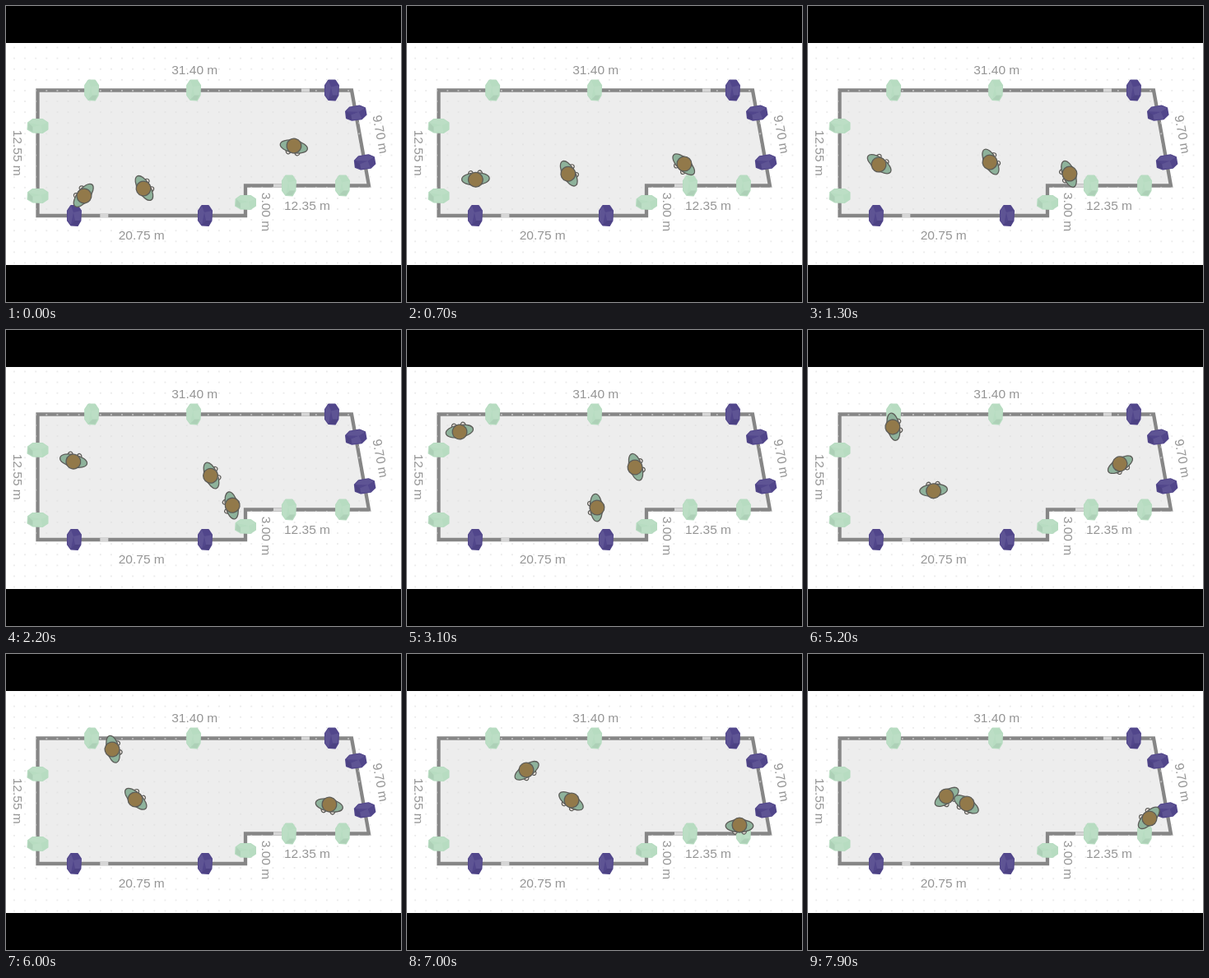
An HTML page that plays this animation: 480x360 px, repeating every 8000 ms.

```html
<!DOCTYPE html>
<html lang="en">
<head>
<meta charset="utf-8">
<title>Floor plan</title>
<style>
html, body { margin: 0; width: 100%; height: 100%; overflow: hidden; background: #000; }
svg { display: block; width: 100vw; height: 100vh; }
text { font: 15.5px "Liberation Sans", Arial, sans-serif; fill: #959595; text-anchor: middle; }
.green { color: #b7dcc1; }
.purple { color: #51468b; }
</style>
</head>
<body>
<svg viewBox="0 0 480 360">
  <defs>
    <pattern id="dots" x="3.500" y="44" width="13.1" height="13.1" patternUnits="userSpaceOnUse">
      <circle cx="6.5" cy="6.5" r=".8" fill="#dedede"/>
    </pattern>
    <g id="gem">
      <path d="M-4-12 4-12 8-6 7.500 6 4 12-4 11.500-8 6-8-6Z" fill="currentColor"
            stroke="currentColor" stroke-width="2" stroke-linejoin="round"/>
      <path d="M-4-12-1-4-4 11-8 6-8-6Z" fill="#fff" opacity=".08"/>
      <path d="M-1-4 8-6 7 6 1 6Z" fill="#fff" opacity=".08"/>
      <path d="M1 6 7 6 4 12-4 11Z" fill="#000" opacity=".05"/>
    </g>
    <g id="walker" stroke="#5c5c58" stroke-width="1.3">
      <ellipse cx="7" cy="-5.500" rx="4" ry="3" fill="#f6ece7"/>
      <ellipse cx="7" cy="5.500" rx="4" ry="3" fill="#f6ece7"/>
      <ellipse cx="1" rx="7.500" ry="16.800" fill="#8eb29b"/>
      <path d="M7-6Q11 0 7 6Z" fill="#f6ece7" stroke="none"/>
      <circle r="8.900" fill="#92794a"/>
    </g>
  </defs>
  <path d="M0 45H480V315H0Z" fill="#fff"/>
  <path id="room" fill="#ededed" stroke="#868686" stroke-width="4.300"/>
  <path d="M0 45H480V315H0Z" fill="url(#dots)"/>
  <g id="plan"></g>
  <g id="people"></g>
</svg>
<script>
const LOOP = 8000;
const DEG = 180 / Math.PI;
const $ = id => document.getElementById(id);

function add(parent, tag, attrs, text = "") {
  const el = document.createElementNS("http://www.w3.org/2000/svg", tag);
  for (const k in attrs) el.setAttribute(k, attrs[k]);
  el.textContent = text;
  parent.append(el);
  return el;
}

const place = (x, y, deg) => `translate(${x} ${y}) rotate(${deg})`;

// Walls run clockwise; marks are fractions of the wall's length.
const walls = [
  { from: [38.5, 102.5], label: "31.40 m", green: [.172, .497], purple: [.937], door: .853 },
  { from: [420, 102.5], label: "9.70 m", purple: [.24, .755] },
  { from: [441, 218.5], label: "12.35 m", green: [.213, .647], door: .74 },
  { from: [291, 218.5], label: "3.00 m", green: [.56] },
  { from: [291, 255], label: "20.75 m", purple: [.194, .824], door: .68 },
  { from: [38.5, 255], label: "12.55 m", green: [.158, .715] }
];
$("room").setAttribute("d", "M" + walls.map(w => w.from).join("L") + "Z");

walls.forEach(({ from: [x, y], label, green = [], purple = [], door }, i) => {
  const [endX, endY] = walls[(i + 1) % walls.length].from;
  const dx = endX - x, dy = endY - y, length = Math.hypot(dx, dy);
  const upright = (Math.atan2(dy, dx) * DEG + 180) % 180;
  const at = (f, out = 0) =>
    place(x + dx * f + dy / length * out, y + dy * f - dx / length * out, upright);

  if (door) add($("plan"), "path", { d: "M-5 0H5", stroke: "#d6d6d6", "stroke-width": 4.3, transform: at(door) });
  for (const [color, spots] of Object.entries({ green, purple }))
    for (const f of spots) add($("plan"), "use", { href: "#gem", class: color, transform: at(f) });
  // On a short wall the label slides past the end.
  add($("plan"), "text", { y: 4.7, transform: at(Math.max(.5, 32 / length), 24.3) }, label);
});

// Waypoints: x, y and, where the walker swerves, a heading in degrees.
const times = [0, 1.3, 3.1, 4.3, 6, 7, 7.9];
const routes = [
  [[95, 231, -142], [86, 193, -54], [64, 124], [73, 118], [129, 116, -14], [145, 141], [168, 173]],
  [[167, 222], [221, 190], [277, 167], [344, 153], [393, 183, 102], [404, 208, 90], [415, 200, -136]],
  [[350, 170, 101], [318, 204], [231, 216], [164, 215], [157, 177], [200, 178, 123], [193, 182, 123]]
];

// Fill in missing headings from the neighbours, always turning the short way.
function withHeadings(route) {
  let last;
  return route.map(([x, y, heading], i) => {
    const prev = route[i - 1] ?? route[i], next = route[i + 1] ?? route[i];
    heading ??= Math.atan2(next[1] - prev[1], next[0] - prev[0]) * DEG;
    last ??= heading;
    last = heading + 360 * Math.round((last - heading) / 360);
    return [x, y, last];
  });
}

const walkers = routes.map(r => ({ path: withHeadings(r), el: add($("people"), "use", { href: "#walker" }) }));

function pose(path, t) {
  let i = 0;
  while (i < times.length - 2 && t > times[i + 1]) i++;
  const [a, b] = [path[i], path[i + 1]];
  const u = Math.min(1, (t - times[i]) / (times[i + 1] - times[i]));
  const ease = u * u * (3 - 2 * u);
  const reach = Math.hypot(b[0] - a[0], b[1] - a[1]);
  const leave = reach * u * (1 - u) ** 2, arrive = reach * u * u * (1 - u);
  const mix = k => a[k] + (b[k] - a[k]) * ease;
  const bend = fn => leave * fn(a[2] / DEG) - arrive * fn(b[2] / DEG);
  return [mix(0) + bend(Math.cos), mix(1) + bend(Math.sin), mix(2)];
}

function draw() {
  const t = performance.now() % LOOP / 1000;
  for (const { path, el } of walkers)
    el.setAttribute("transform", place(...pose(path, t)));
  requestAnimationFrame(draw);
}
draw();
</script>
</body>
</html>
```
